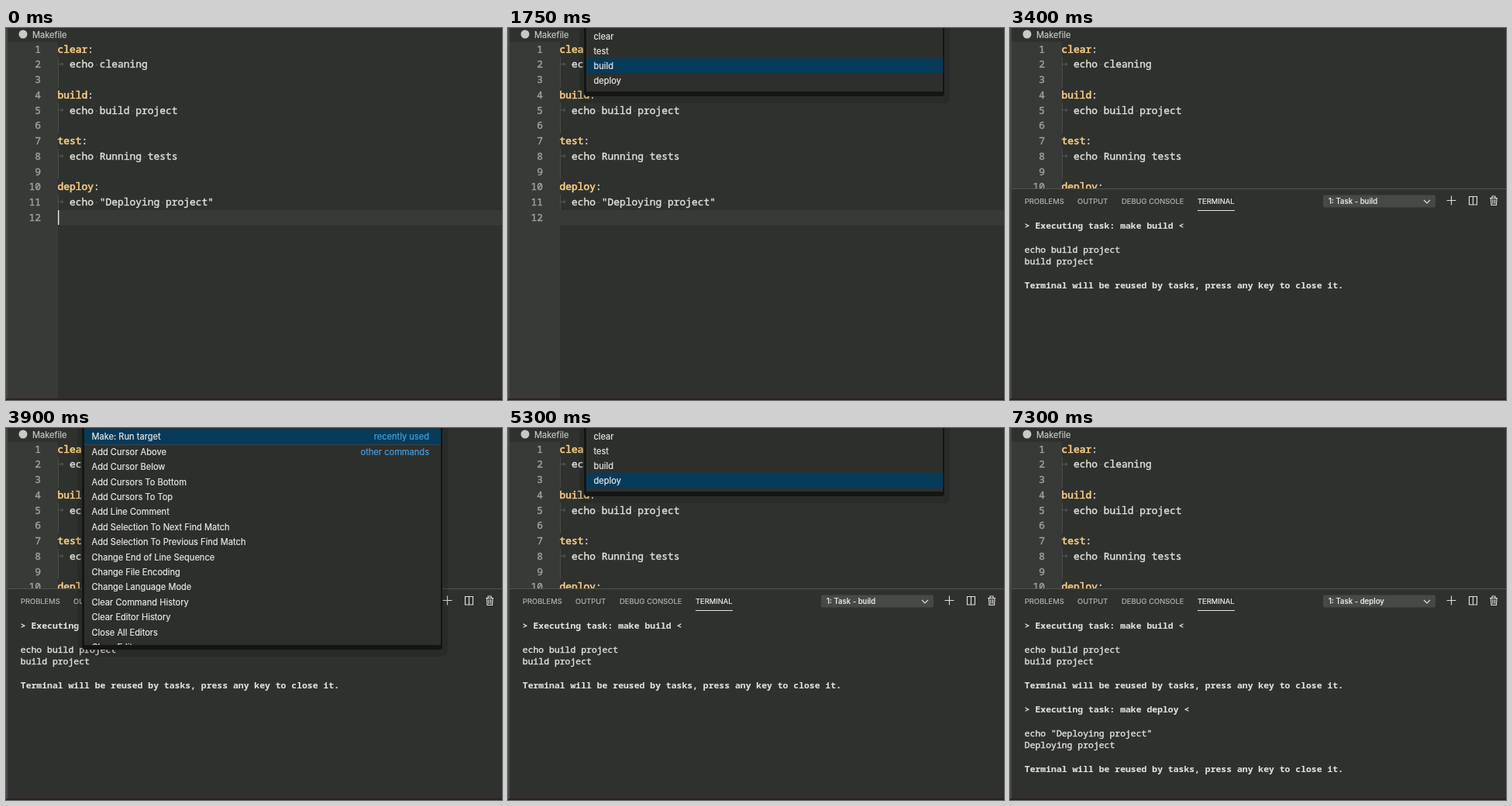
These frames come from a looping animation (640x480 px, 7350 ms). An HTML page:

```html
<!DOCTYPE html>
<html lang="en">
<head>
<meta charset="utf-8">
<title>Run a Makefile target</title>
<style>
  html, body { margin: 0; width: 100%; height: 100%; overflow: hidden; background: #2f312e; }
  svg { display: block; width: 640px; height: 480px; }
  text { white-space: pre; stroke-linejoin: round; }
  .ui { font: 11.1px Inter, "Liberation Sans", sans-serif; fill: #e8e8e5; stroke: #e8e8e5; stroke-width: 0.2; }
  .code { font: 12.92px "Noto Sans Mono", "DejaVu Sans Mono", monospace; fill: #dfe0d9; stroke: #dfe0d9; stroke-width: 0.4; }
  .term { font: 11.43px "Noto Sans Mono", "DejaVu Sans Mono", monospace; fill: #e0e0dc; stroke: #e0e0dc; stroke-width: 0.4; }
  .bold { font-weight: 700; stroke-width: 0.1; }
  .num { fill: #a0a19c; stroke: #a0a19c; text-anchor: end; }
  .key { fill: #f7cb80; stroke: #f7cb80; stroke-width: 0.65; }
  .dim { fill: #5b5d58; stroke: none; }
  .hit { fill: #3a9ce6; stroke: none; font-weight: 700; }
  .side { fill: #459fe2; stroke: #459fe2; text-anchor: end; }
  .file { fill: #c6c7c3; stroke: #c6c7c3; }
  .tab { font-size: 9.4px; fill: #b2b3af; stroke: #b2b3af; }
  .active { fill: #f0f0ee; stroke: #f0f0ee; }
  .task { font-size: 9.65px; font-weight: 500; }
  .line { fill: none; stroke: #dededa; stroke-width: 1.15; }
  .arrow { stroke: #5b5d58; stroke-width: 1; }
</style>
</head>
<body>
<svg id="stage" viewBox="0 0 640 480"></svg>
<script>
const LOOP = 7350;
const NS = "http://www.w3.org/2000/svg";
const stage = document.getElementById("stage");

function add(parent, tag, attrs = {}, content) {
  const node = document.createElementNS(NS, tag);
  for (const key in attrs) node.setAttribute(key, attrs[key]);
  if (content !== undefined) node.textContent = content;
  parent.append(node);
  return node;
}
const group = () => add(stage, "g");
const rect = (parent, x, y, width, height, fill, more = {}) =>
  add(parent, "rect", { x, y, width, height, fill, ...more });
const text = (parent, x, y, cls, content) =>
  add(parent, "text", { x, y, class: cls }, content);
const path = (parent, d, cls = "line") => add(parent, "path", { d, class: cls });

// Editor
const PITCH = 19.73;
const source = [
  "clear:", "\techo cleaning", "",
  "build:", "\techo build project", "",
  "test:", "\techo Running tests", "",
  "deploy:", '\techo "Deploying project"', ""
];

function drawEditor() {
  const g = group();
  rect(g, 0, 0, 640, 480, "#2f312e");
  rect(g, 2, 18, 65, 460, "#383a37");
  add(g, "circle", { cx: 22, cy: 8, r: 5.5, fill: "#c9cac6" });
  text(g, 34, 12.7, "ui file", "Makefile");
  rect(g, 67, 235, 573, 19.5, "#383a37");
  source.forEach((line, i) => {
    const y = 31.7 + i * PITCH;
    text(g, 45, y, "code num", i + 1);
    if (line.endsWith(":")) {
      const label = text(g, 66.5, y, "code");
      add(label, "tspan", { class: "key" }, line.slice(0, -1));
      add(label, "tspan", {}, ":");
    } else if (line) {
      const guide = i === 10 ? PITCH : 2 * PITCH;
      rect(g, 67, 17.4 + i * PITCH, 1, guide, "#4b4d49");
      path(g, `M68 ${y - 4.7}h6m-2.5 -2.2l2.5 2.2l-2.5 2.2`, "line arrow");
      const body = text(g, 82, y, "code");
      line.trim().split(" ").forEach((word, n) => {
        if (n) add(body, "tspan", { class: "dim" }, "·");
        add(body, "tspan", {}, word);
      });
    }
  });
  return rect(g, 67, 235, 1.4, 19, "#e6e6e2");
}

// Terminal panel
function drawPanel() {
  const g = group();
  rect(g, 0, 207, 640, 273, "#2f312e");
  rect(g, 0, 207, 640, 1, "#50524f");
  [[19, "PROBLEMS"], [87, "OUTPUT"], [144, "DEBUG CONSOLE"], [242, "TERMINAL"]]
    .forEach(([x, name]) => text(g, x, 227.2, "ui tab", name));
  g.lastChild.classList.add("active");
  rect(g, 242, 235, 48, 1, "#e4e4e0");
  rect(g, 404, 215.5, 145, 16, "#474946", { rx: 2 });
  const task = text(g, 411, 227.2, "ui task", "");
  path(g, "M534 222l4 4l4 -4");
  path(g, "M563.5 222.5h12M569.5 216.5v12");
  path(g, "M592.5 217.5h10v10.5h-10zM597.5 217.5v10.5");
  path(g, "M619 219.5h10M622 219v-2h4v2M620.5 220l.5 8.5h6.5l.5 -8.5M623 221v6M625.5 221v6");
  return { g, task };
}

const CLOSE = "Terminal will be reused by tasks, press any key to close it.";
// Time shown, row, text, bold
const output = [
  [2150, 0, "> Executing task: make build <", 1],
  [2400, 2, "echo build project"],
  [2400, 3, "build project"],
  [2450, 5, CLOSE, 1],
  [5900, 7, "> Executing task: make deploy <", 1],
  [6150, 9, 'echo "Deploying project"'],
  [6150, 10, "Deploying project"],
  [6200, 12, CLOSE, 1]
];

// Command palette; matched letters stand in brackets
const targets = ["clear", "test", "build", "deploy"];
const matches = ["[Mak]e: Run target", "Tobeda.js: [Ma]nage License [K]ey"];
const commands = [
  "Make: Run target", "Add Cursor Above", "Add Cursor Below",
  "Add Cursors To Bottom", "Add Cursors To Top", "Add Line Comment",
  "Add Selection To Next Find Match", "Add Selection To Previous Find Match",
  "Change End of Line Sequence", "Change File Encoding", "Change Language Mode",
  "Clear Command History", "Clear Editor History", "Close All Editors", "Close Editor"
];

function drawPalette(rows, selected, bottom, sides) {
  const g = group();
  rect(g, 92, -20, 478, bottom + 34, "#000", { rx: 7, opacity: 0.12 });
  rect(g, 98, -20, 465, bottom + 25, "#141513", { rx: 4 });
  rect(g, 101, -20, 460, bottom + 19, "#2d2f2c");
  const clip = add(g, "clipPath", { id: "clip" + stage.children.length });
  rect(clip, 101, 0, 460, bottom - 1);
  const list = add(g, "g", { "clip-path": `url(#${clip.id})` });
  const pitch = sides ? 19.4 : 18.9;
  rows.forEach((row, i) => {
    const top = 1 + i * pitch;
    if (i === selected) rect(list, 101, top, 460, 20, "#073b5a");
    if (sides && i === 1) rect(list, 101, top + 0.6, 460, 0.8, "#454744");
    const y = top + 14.3;
    const label = text(list, 110.5, y, "ui");
    row.split(/[\[\]]/).forEach((part, n) =>
      add(label, "tspan", n % 2 ? { class: "hit" } : {}, part));
    if (sides && i < 2) text(list, 546, y, "ui side", i ? "other commands" : "recently used");
  });
  return g;
}

const caret = drawEditor();
const panel = drawPanel();
const lines = output.map(([at, row, content, bold]) => ({
  at,
  node: text(panel.g, 18.8, 259 + row * 15.43, bold ? "term bold" : "term", content)
}));
const palettes = {
  short: drawPalette(commands, 0, 223, true),
  tall: drawPalette(commands, 0, 281, true),
  typed: drawPalette(matches, 0, 44, true)
};
targets.forEach((name, i) => palettes[name] = drawPalette(targets, i, 83, false));
rect(stage, 0, 0, 2, 480, "#484a47");
rect(stage, 0, 478, 640, 2, "#2c2024");

const steps = [
  [0, ""], [350, "short"], [850, "typed"], [1300, "clear"], [1500, "test"],
  [1650, "build"], [1950, ""], [3500, "tall"], [4050, "typed"], [4400, "clear"],
  [4850, "test"], [5000, "build"], [5150, "deploy"], [5550, ""]
];
const show = (node, on) => node.style.display = on ? "" : "none";

function frame() {
  const t = performance.now() % LOOP;
  const open = steps.filter(([at]) => at <= t).pop()[1];
  for (const name in palettes) show(palettes[name], name === open);
  show(caret, t < 350);
  show(panel.g, t >= 2050);
  panel.task.textContent = "1: Task - " + (t < 5850 ? "build" : "deploy");
  lines.forEach(({ at, node }) => show(node, t >= at));
  requestAnimationFrame(frame);
}
frame();
</script>
</body>
</html>
```
